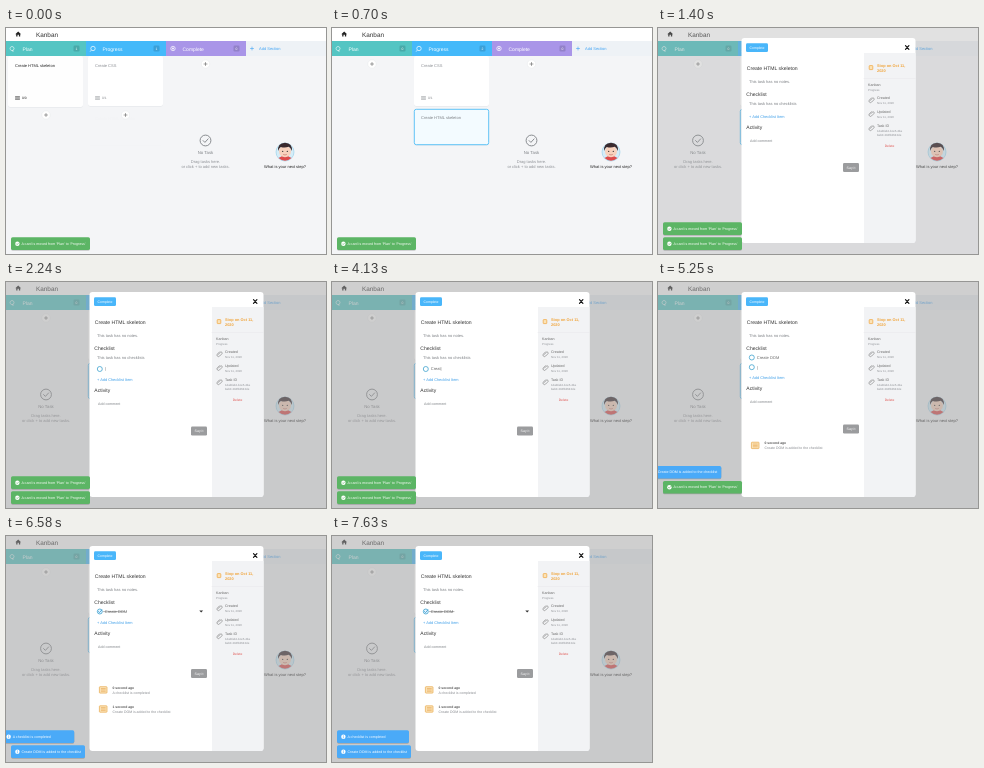
These frames come from a looping animation (320 by 226 pixels, 8 s). An HTML page:

```html
<!DOCTYPE html>
<html lang="en">
<head>
<meta charset="utf-8">
<title>Kanban</title>
<style>
  html, body { margin: 0; width: 100%; height: 100%; overflow: hidden; background: #f4f5f7; }
  svg { display: block; width: 100%; height: 100%; }
  text { font-family: "Liberation Sans", Arial, sans-serif; text-rendering: geometricPrecision; white-space: pre; }
</style>
</head>
<body>
<svg id="stage" viewBox="0 0 320 226"></svg>
<script>
const LOOP = 8000;
const GREEN = '#5cb565', BLUE = '#4aaaf8', GREY = '#7d8085', DARK = '#333';
const DROP = 70, OPEN = 1050, ADD = 2170, ENTER = 4970, CHECK = 6400;

const TOASTS = [
  { text: "A card is moved from 'Plan' to 'Progress'", fill: GREEN, w: 79, from: -1000, to: 4900 },
  { text: "A card is moved from 'Plan' to 'Progress'", fill: GREEN, w: 79, from: 1090, to: 6010 },
  { text: 'Create DOM is added to the checklist', fill: BLUE, w: 74, from: 5120, to: 1e6 },
  { text: 'A checklist is completed', fill: BLUE, w: 72, from: 6420, to: 1e6 }
];
const KEYS = [3430, 3710, 3850, 3920, 4130, 4410, 4620, 4690, 4760, 4830];

const ramp = (t, a, b) => Math.min(1, Math.max(0, (t - a) / (b - a)));
const easeOut = p => 1 - (1 - p) ** 3;

// y is the middle of the text's capital letters
const text = (s, x, y, size, fill = GREY, extra = '') =>
  `<text x="${x}" y="${y + size * .36}" font-size="${size}" fill="${fill}" ${extra}>${s}</text>`;
const mid = (s, x, y, size, fill, extra = '') => text(s, x, y, size, fill, `text-anchor="middle" ${extra}`);
const rect = (x, y, w, h, fill, r = 0, extra = '') =>
  `<rect x="${x}" y="${y}" width="${w}" height="${h}" rx="${r}" fill="${fill}" ${extra}/>`;
const circle = (x, y, r, fill, extra = '') => `<circle cx="${x}" cy="${y}" r="${r}" fill="${fill}" ${extra}/>`;
const line = (d, color, w = .6) =>
  `<path d="${d}" fill="none" stroke="${color}" stroke-width="${w}" stroke-linecap="round" stroke-linejoin="round"/>`;
const group = (body, opacity = 1, dx = 0, dy = 0) =>
  opacity > 0 ? `<g opacity="${opacity}" transform="translate(${dx} ${dy})">${body}</g>` : '';

const plus = (x, y) => circle(x, y, 4.2, '#fff', 'stroke="#e6e8eb" stroke-width=".5"') +
  line(`M${x - 1.5} ${y}h3M${x} ${y - 1.5}v3`, '#666', .6);

function card(x, y, h, title, ink, info) {
  return rect(x, y + .6, 75, h, '#e2e4e8', 2) + rect(x, y, 75, h, '#fff', 2) +
    text(title, x + 7, y + 10, 4, ink) +
    (info ? line(`M${x + 7.5} ${y + 40.7}h4M${x + 7.5} ${y + 42}h4M${x + 7.5} ${y + 43.3}h4`, ink, .6) +
      text(info, x + 14, y + 42, 3.3, ink) : '');
}

function header(x, name, fill, count) {
  const ring = name === 'Plan'
    ? line('M7 23.5v-1.2a2 2 0 1 1 0-3.5a2 2 0 0 1 0 3.5', '#fff')
    : circle(x + 7, 20.5, 2.2, 'none', 'stroke="#fff" stroke-width=".7"') +
      (name === 'Complete' ? circle(x + 7, 20.5, .9, '#fff') : line(`M${x + 5} 22.4l-.7 1`, '#fff'));
  return rect(x, 13, 80, 15, fill) + ring + text(name, x + 16.5, 20.7, 5, '#fff') +
    rect(x + 67.5, 17.5, 6, 6, '#0002', 1.2) + mid(count, x + 70.5, 20.6, 3.4, '#fff');
}

const noTask = x =>
  circle(x, 112.5, 5.4, 'none', `stroke="${GREY}" stroke-width=".9"`) +
  line(`M${x - 2.4} 112.6l1.8 1.8l3.2-3.5`, GREY, .9) +
  mid('No Task', x, 124.5, 4.3) +
  mid('Drag tasks here.', x, 133.5, 4, '#8d9095') +
  mid('or click + to add new tasks.', x, 138.7, 4, '#8d9095');

const helper =
  circle(279, 124, 9, '#d5edf8', 'stroke="#8fcdea" stroke-width=".6"') +
  '<path d="M272.5 130q6.5-5 13 0q-6.500 5.500-13 0z" fill="#dd4b4b"/>' +
  '<ellipse cx="279" cy="123.500" rx="6" ry="5.800" fill="#f8d2bd"/>' +
  '<path d="M272.200 123q-1-8 6.800-8.300q7.800.3 6.800 8.300q-1.200-3.500-3-4.200q-4 1.500-8 .2q-1.800.8-2.600 4z" fill="#3a2a2e"/>' +
  circle(276.7, 123.4, .6, '#333') + circle(281.3, 123.4, .6, '#333') +
  line('M277.500 126.600q1.500 1 3 0', '#b5554f', .5);

function board(t) {
  const moved = ramp(t, 0, 280), glow = ramp(t, 420, 700), done = t >= DROP;
  const home = '<path d="M9.300 6.200L12.200 3.500L15.100 6.200H14.200V8.500H12.900V6.800H11.500V8.500H10.200V6.200z" fill="#222"/>';
  return rect(0, 0, 320, 226, '#f4f5f7') + rect(0, 0, 320, 13, '#fff') + home +
    text('Kanban', 30, 6.2, 6.4, DARK) +
    header(0, 'Plan', '#54c5c3', done ? 0 : 1) +
    header(80, 'Progress', '#44b9fa', done ? 2 : 1) +
    header(160, 'Complete', '#a995e8', 0) +
    rect(240, 13, 80, 15, '#eef2f6') + line('M244.500 20.500h3M246 19v3', '#42a5f5', .6) +
    text('Add Section', 253, 20.7, 4, '#42a5f5') +
    group(card(2, 28, 51, 'Create HTML skeleton', '#222', '0/0') + plus(40, 87), 1 - moved) +
    card(82, 28, 50, 'Create CSS', '#8a8d92', '0/1') +
    group(plus(119.5, 87), 1 - moved) +
    group(plus(40, 36), moved) + plus(199.5, 36) +
    group(card(82, 81, 36, 'Create HTML skeleton', GREY) +
      group(rect(82.3, 81.3, 74.4, 35.4, '#f3fbff', 2, 'stroke="#4fbdf5" stroke-width=".9"') +
        text('Create HTML skeleton', 89, 90, 4, GREY), glow), moved) +
    noTask(199.5) + group(noTask(40), ramp(t, 840, 1260)) +
    helper + mid('What is your next step?', 279, 138.2, 4, '#222');
}

const box = (y, done) =>
  circle(93.8, y, 2.5, done ? '#e8f6ff' : '#fff', 'stroke="#3fa3cf" stroke-width=".8"') +
  (done ? line(`M92.500 ${y}l1 1.100l2.300-2.600`, '#2b93d0', .8) : '');

function activity(y, when, what) {
  return rect(93.4, y - 3, 7.6, 6.4, '#fbe3b8', .6, 'stroke="#e8a94c" stroke-width=".7"') +
    line(`M95.300 ${y - 1.2}h4M95.300 ${y + .2}h4M95.300 ${y + 1.6}h4`, '#e0983a', .5) +
    text(when, 106.5, y - 2.2, 3.4, '#555', 'font-weight="bold"') + text(what, 106.5, y + 3, 3.5, '#85888d');
}

function sidebar() {
  const clip = y => line(`M212.400 ${y + .3}l2-2a1 1 0 0 1 1.500 1.500l-2.300 2.300a1.500 1.500 0 0 1-2.200-2.100l2.200-2.200`, '#777', .6);
  const field = (y, name, value) => clip(y + 2) + text(name, 219, y, 3.6, '#666') + text(value, 219, y + 5, 2.9, '#909398');
  return '<path d="M206 25H257.500V212a3 3 0 0 1-3 3H206z" fill="#f2f3f5"/>' +
    rect(211.2, 37.6, 3.6, 4, '#fbe3b8', .5, 'stroke="#f0a53c" stroke-width=".7"') +
    text('Stop on Oct 11,', 219, 37.6, 3.9, '#f0a53c', 'font-weight="bold"') +
    text('2020', 219, 42.3, 3.9, '#f0a53c', 'font-weight="bold"') +
    line('M206 50.500H257.500', '#e2e4e7', .4) +
    text('Kanban', 210, 57.2, 3.6, '#666') + text('Progress', 210, 62, 2.9, '#909398') +
    field(70, 'Created', 'Nov 11, 2020') + field(83.8, 'Updated', 'Nov 11, 2020') +
    field(98, 'Task ID', '1dabfab2-bce5-4ba') + text('bab0-304fbb543de', 219, 106.6, 2.9, '#909398') +
    mid('Delete', 231.5, 117.8, 3.3, '#e0524f');
}

function checklist(t) {
  const off = t >= 2660 && t < 3220 || t >= 5670 && t < 6090;
  const caret = off ? '' : '|';
  const typed = 'Create DOM'.slice(0, KEYS.filter(k => t >= k).length);
  const input = (y, s) => box(y) + text(s + caret, 98.8, y, 4, '#666');
  if (t < ENTER) return text('This task has no checklists', 91, 76, 4) + (t >= ADD ? input(87, typed) : '');
  const done = t >= CHECK;
  return box(75.5, done) + text('Create DOM', 98.8, 75.4, 4, '#666') +
    (done ? line(`M97.500 75.600H${97.5 + 24.5 * ramp(t, CHECK, CHECK + 210)}`, '#666', .5) : input(85.2, '')) +
    (t >= 5880 ? '<path d="M193.300 74.500h3.800l-1.900 2.100z" fill="#333"/>' : '');
}

function modal(t) {
  const shift = t < ADD ? 0 : t < ENTER ? 9.5 : t < CHECK ? 7.5 : -2;
  const added = 'Create DOM is added to the checklist';
  const log = t < ENTER ? '' : t < CHECK ? activity(163.2, '0 second ago', added)
    : activity(153.7, '0 second ago', 'A checklist is completed') + activity(172.8, '1 second ago', added);
  return rect(83.5, 10, 174, 205, '#fff', 3) + sidebar() +
    rect(88, 15.3, 22, 8.8, '#49b6fa', 1.4) + mid('Complete', 99, 19.7, 3.5, '#fff') +
    line('M247.500 17.700l3.400 3.600M250.900 17.700l-3.400 3.600', '#111', 1.2) +
    text('Create HTML skeleton', 88.8, 40.5, 5.1, DARK) +
    text('This task has no notes.', 91, 53.3, 4) +
    text('Checklist', 88.3, 66, 5, DARK) + checklist(t) +
    group(text('+ Add Checklist Item', 91, 88.4, 3.9, '#3f9fe8') +
      text('Activity', 88.3, 99, 5, DARK) +
      text('Add comment', 92, 112.7, 3.6, GREY) +
      rect(185, 135, 16, 9, '#9b9c9e', 1.2) + mid('Say it', 193, 139.5, 3.5, '#fff'), 1, 0, shift) + log;
}

function toasts(t) {
  let y = 209.3, out = '';
  for (const { text: s, fill, w, from, to } of TOASTS) {
    const dx = -88 * (1 - easeOut(ramp(t, from, from + 300)) + ramp(t, to, to + 280) ** 2);
    if (t >= from) {
      const icon = circle(11.4, 6.4, 2.2, '#fff') +
        line(fill === GREEN ? 'M10.400 6.500l.8.800l1.400-1.600' : 'M11.400 5.400v.1M11.400 6.400v1.200', fill, .6);
      out += group(rect(5, .8, w, 12.6, '#0003', 1.6) + rect(5, 0, w, 12.6, fill, 1.6) + icon +
        text(s, 15.4, 6.3, 3.6, '#fff'), 1, dx, y);
    }
    y -= 15 * (1 - ramp(t, to + 290, to + 490));
  }
  return out;
}

const stage = document.getElementById('stage');
function draw(now) {
  const t = now % LOOP;
  const shown = ramp(t, OPEN, OPEN + 280);
  stage.innerHTML = board(t) +
    group(rect(0, 0, 320, 226, '#a0a0a0'), .5 * ramp(t, OPEN, 1610)) +
    group(modal(t), shown, 0, -6 * (1 - easeOut(shown))) + toasts(t);
  requestAnimationFrame(draw);
}
draw(0);
</script>
</body>
</html>
```
